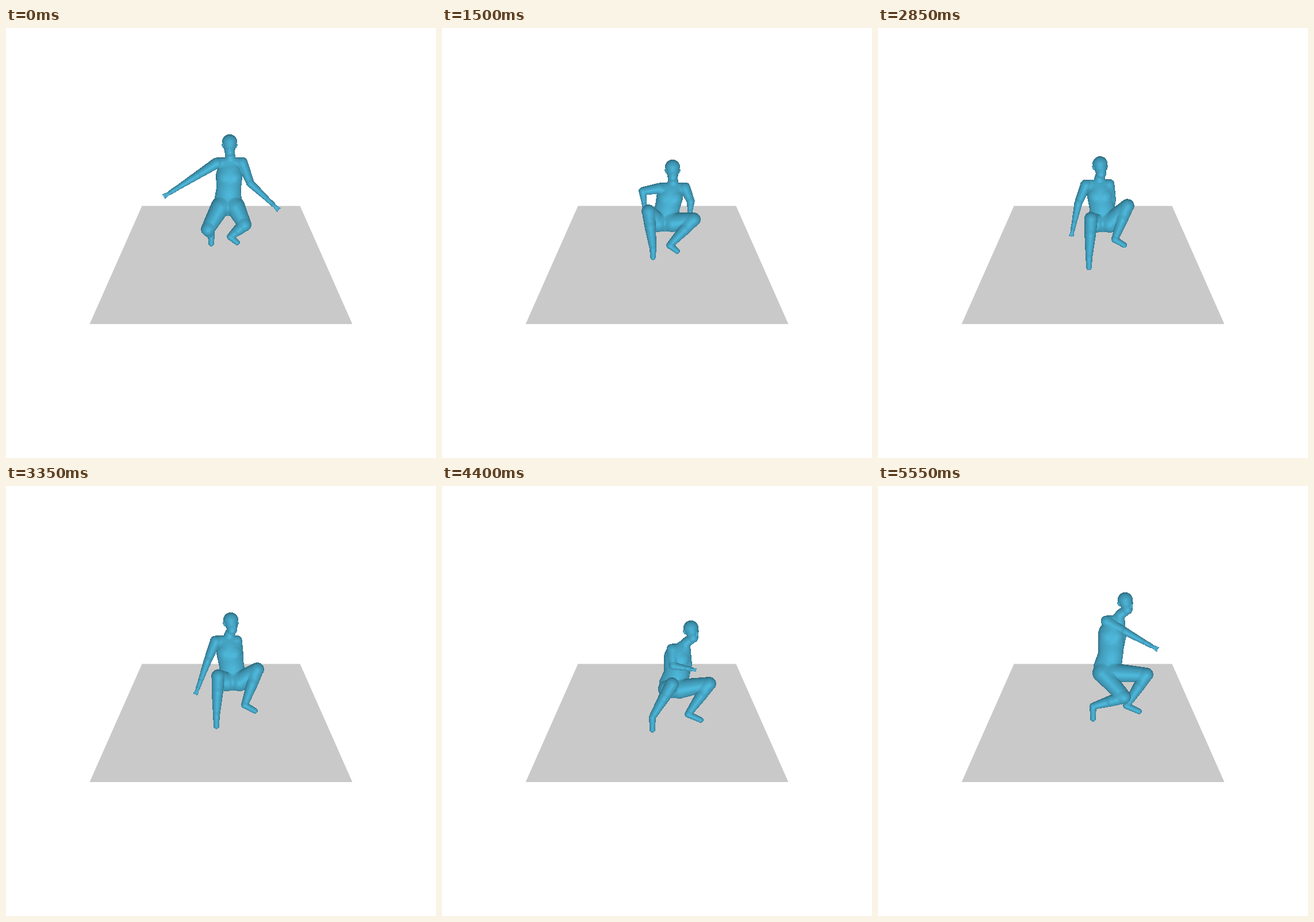
Recreate the animation shown at these times as an HTML page with a canvas. Size 748 by 748 pixels, loop 5.6 s.

```html
<!DOCTYPE html>
<html lang="en">
<head>
<meta charset="utf-8">
<title>Crouching figure</title>
<style>
html, body { margin: 0; width: 100%; height: 100%; overflow: hidden; background: #fff; }
canvas { display: block; }
</style>
</head>
<body>
<canvas id="stage" width="748" height="748"></canvas>
<script>
const ctx = document.getElementById('stage').getContext('2d', { willReadFrequently: true });
const LOOP = 5600, STEP = 50;
const BOX = { x: 260, y: 170, w: 256, h: 280 };

// The head, hips and limb ends follow key points; all other joints are derived.
const keyTimes = [0, 700, 1500, 2400, 3350, 4400, 5550];
const paths = {
  head: [[389, 198], [375, 241], [401, 242], [382, 239], [391, 233], [433, 247], [430, 198]],
  pelvis: [[386, 303], [385, 328], [388, 330], [388, 330], [394, 332], [402, 345], [399, 317]],
  handL: [[275, 293], [345, 334], [354, 322], [342, 361], [330, 362], [441, 320], [486, 284]],
  kneeL: [[351, 350], [352, 335], [359, 319], [372, 333], [369, 331], [400, 345], [428, 367]],
  ankleL: [[357, 361], [368, 358], [367, 384], [368, 399], [366, 399], [366, 402], [374, 383]],
  kneeR: [[415, 342], [434, 335], [438, 333], [431, 301], [437, 319], [465, 344], [467, 328]],
  ankleR: [[390, 363], [385, 364], [396, 378], [409, 356], [415, 381], [428, 397], [432, 382]]
};

const lerp = (a, b, f) => a + (b - a) * f;
const clamp = v => Math.max(0, Math.min(1, v));
const mix = (a, b, f) => ({ x: lerp(a.x, b.x, f), y: lerp(a.y, b.y, f), z: lerp(a.z, b.z, f) });
const shift = (p, x, y, z = 0) => ({ x: p.x + x, y: p.y + y, z: p.z + z });

function poseAt(t) {
  const i = keyTimes.findLastIndex((k, n) => k <= t && n < keyTimes.length - 1);
  const u = clamp((t - keyTimes[i]) / (keyTimes[i + 1] - keyTimes[i]));
  const f = lerp(u, u * u * (3 - 2 * u), 0.5);
  const at = (name, z) => {
    const [a, b] = paths[name].slice(i, i + 2);
    return { x: lerp(a[0], b[0], f), y: lerp(a[1], b[1], f), z };
  };

  const progress = clamp((t - 700) / 3700);
  const turn = progress ** 1.5, side = turn * turn;
  const spread = clamp(1 - t / 700);
  const tuck = (1 - progress) ** 6;

  const head = at('head', 0), pelvis = at('pelvis', -6);
  const neck = shift(head, 1 - 10 * side, 26, -6);
  const shoulderL = shift(neck, -24, 11, 4);
  const shoulderR = shift(neck, 21 - 22 * side, 10, -2);

  // A shorter reach bends the left elbow further outwards.
  const handL = at('handL', 40 * progress - 15);
  const dx = handL.x - shoulderL.x, dy = handL.y - shoulderL.y, reach = Math.hypot(dx, dy);
  const bend = 0.45 * Math.max(0, 100 - reach) / reach;

  return {
    head, neck, pelvis,
    chin: shift(head, 4 * turn, 16.5, 4),
    nose: shift(head, 11 * turn, 12, 11 - turn),
    chest: shift(mix(neck, pelvis, 0.4), -6 * side, -4 * side),
    waist: mix(neck, pelvis, 0.73),
    L: {
      shoulder: shoulderL,
      elbow: shift(mix(shoulderL, handL, 0.37), -dy * bend, dx * bend),
      hand: handL,
      hip: shift(pelvis, 4 * turn - 13, 8, 3),
      knee: at('kneeL', 24),
      ankle: at('ankleL', 4),
      foot: [0, 14 + 8 * turn]
    },
    R: {
      shoulder: shoulderR,
      elbow: shift(shoulderR, lerp(5 + 21 * tuck, 14, spread), lerp(27 - 16 * tuck, 36, spread), -3),
      hand: shift(shoulderR, lerp(4 + 18 * tuck, 63, spread), lerp(52, 82, spread), -10),
      hip: shift(pelvis, 13 - 2 * turn, 8, 3),
      knee: at('kneeR', 18),
      ankle: at('ankleR', 10),
      foot: [12 + 10 * turn, 10]
    }
  };
}

// A body part is a tapered capsule; flat < 1 makes it shallower.
function bodyParts(p) {
  const parts = [];
  const add = (a, ra, b, rb, flat = 1) => parts.push({ a, ra, b, rb, flat });

  add(p.neck, 9, p.chest, 22.5, 0.6);
  add(p.chest, 23, p.waist, 21.5, 0.6);
  add(p.waist, 21.5, p.pelvis, 24.5, 0.6);
  add(p.L.shoulder, 9.5, p.R.shoulder, 9, 0.7);
  add(p.neck, 9, p.chin, 8.5);
  add(p.head, 13, p.chin, 9);
  add(shift(p.nose, 0, -4, -1), 1.5, p.nose, 2.5);
  for (const s of [-1, 1]) {
    const bust = shift(p.chest, 10 * s, 3, 5);
    add(bust, 11, bust, 11, 0.7);
    const ear = shift(p.head, 11.5 * s, 5, -2 - 3 * s);
    add(ear, 2.5, shift(ear, -s, 4), 2);
  }

  for (const { shoulder, elbow, hand, hip, knee, ankle, foot } of [p.L, p.R]) {
    const wrist = mix(elbow, hand, 0.62), palm = mix(wrist, hand, 0.5);
    const dx = hand.x - palm.x, dy = hand.y - palm.y;
    add(shoulder, 9.5, elbow, 7);
    add(elbow, 7, wrist, 4.3);
    add(wrist, 4.3, palm, 4);
    for (const k of [-0.25, 0, 0.25]) add(palm, 2.4, shift(hand, -dy * k, dx * k), 1.4);

    const calf = mix(knee, ankle, 0.4);
    add(hip, 17, knee, 12);
    add(knee, 11.5, calf, 10);
    add(calf, 10, ankle, 6);
    add(ankle, 6, shift(ankle, ...foot, 4), 4.8);
  }
  return parts;
}

const size = BOX.w * BOX.h;
const height = new Float32Array(size);
const normal = new Float32Array(size * 3);

// Lay a part into the height field, blending with surfaces of similar depth.
function raise({ a, ra, b, rb, flat }) {
  const r = Math.max(ra, rb), blend = 6;
  const vx = b.x - a.x, vy = b.y - a.y, len2 = vx * vx + vy * vy || 1;
  const x0 = Math.max(BOX.x, Math.floor(Math.min(a.x, b.x) - r));
  const x1 = Math.min(BOX.x + BOX.w - 1, Math.ceil(Math.max(a.x, b.x) + r));
  const y0 = Math.max(BOX.y, Math.floor(Math.min(a.y, b.y) - r));
  const y1 = Math.min(BOX.y + BOX.h - 1, Math.ceil(Math.max(a.y, b.y) + r));
  for (let y = y0; y <= y1; y++) for (let x = x0; x <= x1; x++) {
    const px = x + 0.5, py = y + 0.5;
    const f = clamp(((px - a.x) * vx + (py - a.y) * vy) / len2);
    const rad = lerp(ra, rb, f);
    const nx = (px - a.x - vx * f) / rad, ny = (py - a.y - vy * f) / rad;
    const q = nx * nx + ny * ny;
    if (q >= 1) continue;
    const nz = Math.sqrt(1 - q), h = lerp(a.z, b.z, f) + rad * nz * flat;
    const i = (y - BOX.y) * BOX.w + x - BOX.x;
    const w = clamp(0.5 + (h - height[i]) / (2 * blend));
    height[i] = lerp(height[i], h, w) + blend * w * (1 - w);
    [nx * flat, ny * flat, nz].forEach((n, c) => normal[3 * i + c] = lerp(normal[3 * i + c], n, w));
  }
}

function drawGround() {
  ctx.fillStyle = '#fff';
  ctx.fillRect(0, 0, 748, 748);
  ctx.fillStyle = '#c9c9c9';
  ctx.beginPath();
  ctx.moveTo(236.5, 309.5);
  ctx.lineTo(511.5, 309.5);
  ctx.lineTo(602.5, 515);
  ctx.lineTo(145.5, 515);
  ctx.fill();
}

function draw(t) {
  drawGround();
  height.fill(-999);
  normal.fill(0);
  bodyParts(poseAt(t)).forEach(raise);
  const image = ctx.getImageData(BOX.x, BOX.y, BOX.w, BOX.h);
  for (let i = 0; i < size; i++) {
    if (height[i] < -900) continue;
    const [nx, ny, nz] = normal.subarray(3 * i, 3 * i + 3);
    const light = Math.max(0, (0.05 * nx + 0.2 * ny + 0.98 * nz) / (Math.hypot(nx, ny, nz) || 1));
    const tone = 0.53 + 0.36 * light + 0.09 * light ** 20;
    [80, 188, 224].forEach((c, k) => image.data[4 * i + k] = c * tone);
  }
  ctx.putImageData(image, BOX.x, BOX.y);
}

let shown = -1;
function tick() {
  const t = Math.floor(performance.now() % LOOP / STEP) * STEP;
  if (t !== shown) draw(shown = t);
  requestAnimationFrame(tick);
}
tick();
</script>
</body>
</html>
```
